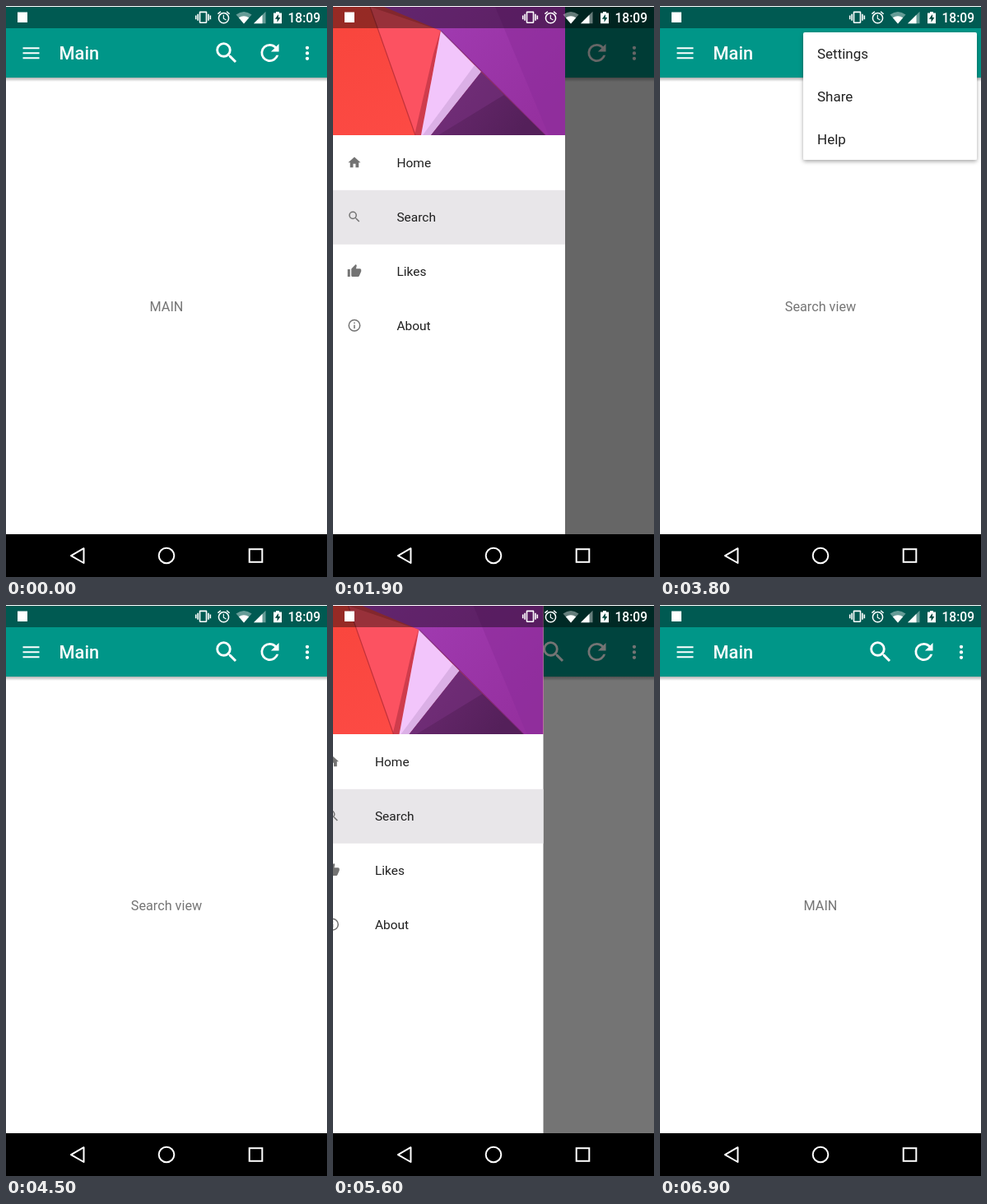
Recreate the animation shown at these times as an HTML page. Size 390 by 694 pixels, loop 7000 ms.

```html
<!DOCTYPE html>
<html lang="en">
<head>
<meta charset="utf-8">
<title>Navigation drawer</title>
<style>
  html, body { margin: 0; width: 100%; height: 100%; overflow: hidden; background: #fff; }
  svg { display: block; width: 100%; height: 100%; }
  text { font-family: Roboto, "Noto Sans", sans-serif; }
  .item { font-size: 15.5px; fill: #1f1f1f; }
  .menu { font-size: 17px; fill: #212121; }
  .body { font-size: 16.2px; fill: #757575; text-anchor: middle; }
</style>
</head>
<body>
<svg viewBox="0 0 390 694" xmlns="http://www.w3.org/2000/svg">
  <defs>
    <linearGradient id="shade" x2="0" y2="1">
      <stop stop-opacity=".3"/><stop offset="1" stop-opacity="0"/>
    </linearGradient>
    <linearGradient id="red" x2="1" y2="1">
      <stop stop-color="#f8453c"/><stop offset="1" stop-color="#ff4d49"/>
    </linearGradient>
    <linearGradient id="violet" x2="1" y2=".7">
      <stop stop-color="#a43eb6"/><stop offset="1" stop-color="#95309f"/>
    </linearGradient>
    <linearGradient id="plum" x2="1" y2=".4">
      <stop stop-color="#6d2a72"/><stop offset="1" stop-color="#54205a"/>
    </linearGradient>
    <filter id="lift" x="-10%" y="-10%" width="120%" height="125%">
      <feDropShadow dx="0" dy="2" stdDeviation="2.5" flood-opacity=".35"/>
    </filter>
    <clipPath id="header"><rect y="1" width="282" height="156"/></clipPath>
  </defs>

  <rect width="390" height="694" fill="#fff"/>
  <rect y="1" width="390" height="86" fill="#009688"/>
  <rect y="87" width="390" height="5" fill="url(#shade)"/>
  <path d="M20.5 51.2h20M20.5 57.2h20M20.5 63.2h20" stroke="#fff" stroke-width="2.1"/>
  <text x="64.5" y="65.3" font-size="21.8" font-weight="500" fill="#fff">Main</text>
  <g id="actions" fill="#fff" fill-rule="evenodd"></g>
  <text id="content" class="body" x="195" y="371"></text>

  <g id="popup">
    <rect x="174" y="32" width="211" height="155" rx="2" fill="#fff" filter="url(#lift)"/>
    <g id="options"></g>
  </g>

  <rect id="scrim" y="1" width="390" height="641"/>
  <g id="drawer">
    <rect y="1" width="282" height="641" fill="#fff"/>
    <g clip-path="url(#header)">
      <rect y="1" width="282" height="156" fill="url(#red)"/>
      <path d="M45 1H140L107 157H100Z" fill="#fc5261"/>
      <path d="M45 1H131V30L60 6Z" fill="#d9404a"/>
      <path d="M131 28L122 58 99 157H108Z" fill="#cf3c4c"/>
      <path d="M45 1L100 157" stroke="#c2323a" stroke-width="1.2"/>
      <path d="M62 1H282V157H258L131 30Z" fill="url(#violet)"/>
      <path d="M197 1H282V157H262Z" fill="#8d2c9b" opacity=".55"/>
      <path d="M131 30L180 80 119 157H107Z" fill="#f2c5fb"/>
      <path d="M172 72L180 80 119 157H109Z" fill="#dbb0e6"/>
      <path d="M180 80L258 157H119Z" fill="url(#plum)"/>
      <path d="M180 80L208 108 128 157H119Z" fill="#7b3382" opacity=".5"/>
      <path d="M131 30L258 157" stroke="#64206f" stroke-width="1.2" opacity=".6"/>
    </g>
    <rect id="mark" width="282" height="66" fill="#e8e6e9"/>
    <g id="items" fill="#737373" fill-rule="evenodd"></g>
  </g>

  <rect y="1" width="390" height="26" opacity=".4"/>
  <rect width="390" height="1" fill="#fff"/>
  <rect x="14" y="7.5" width="12" height="12.5" fill="#fff"/>
  <g id="status" fill="#fff" fill-rule="evenodd"></g>
  <g fill="#fff">
    <path d="M279.5 10.5Q289 3.5 298.5 10.5L289 21.5Z" opacity=".4"/>
    <path d="M282.8 14.3Q289 10 295.2 14.3L289 21.5Z"/>
    <path d="M301 21.3L315.5 6.8V21.3Z" opacity=".4"/>
    <path d="M301 21.3L311.5 10.8V21.3Z"/>
    <path d="M328 7h4v1.6h3V21.2H325V8.6h3Z"/>
    <path d="M331 10L326.8 15.8H329.5V19.8L333.4 14H331Z" fill="#00483f"/>
    <text x="342.5" y="19.7" font-size="15.6" font-weight="500">18:09</text>
  </g>

  <rect y="642" width="390" height="52"/>
  <g fill="none" stroke="#fff" stroke-width="2">
    <path d="M94.5 659.2V677L79 668.1Z" stroke-linejoin="round"/>
    <circle cx="195" cy="668" r="9.3"/>
    <rect x="295.7" y="660.2" width="15.6" height="15.6"/>
  </g>
</svg>
<script>
const LOOP = 7000, STEP = 100, WIDTH = 282, SETTLE = 512;
const ROW = 66.2, TOP = 157;

const icons = {
  search: 'M15.5 14h-.79l-.28-.27A6.47 6.47 0 0 0 16 9.5 6.5 6.5 0 1 0 9.5 16c1.61 0 3.09-.59 4.23-1.57l.27.28v.79l5 4.99L20.49 19zm-6 0a4.5 4.5 0 1 1 0-9 4.5 4.5 0 0 1 0 9z',
  refresh: 'M17.65 6.35A7.96 7.96 0 0 0 12 4a8 8 0 1 0 7.73 10h-2.08A6 6 0 1 1 12 6c1.66 0 3.14.69 4.22 1.78L13 11h7V4z',
  more: 'M12 8a2 2 0 1 0 0-4 2 2 0 0 0 0 4zm0 2a2 2 0 1 0 0 4 2 2 0 0 0 0-4zm0 6a2 2 0 1 0 0 4 2 2 0 0 0 0-4z',
  home: 'M10 20v-6h4v6h5v-8h3L12 3 2 12h3v8z',
  like: 'M1 21h4V9H1zm22-11a2 2 0 0 0-2-2h-6.31l.95-4.57.03-.32c0-.41-.17-.79-.44-1.06L14.17 1 7.59 7.59A1.96 1.96 0 0 0 7 9v10a2 2 0 0 0 2 2h9c.83 0 1.54-.5 1.84-1.22l3.02-7.05c.09-.23.14-.47.14-.73z',
  info: 'M11 17h2v-6h-2zm1-15a10 10 0 1 0 0 20 10 10 0 0 0 0-20zm0 18a8 8 0 1 1 0-16 8 8 0 0 1 0 16zM11 9h2V7h-2z',
  vibrate: 'M0 15h2V9H0zm3 2h2V7H3zm19-8v6h2V9zm-3 8h2V7h-2zM16.5 3h-9C6.67 3 6 3.67 6 4.5v15c0 .83.67 1.5 1.5 1.5h9c.83 0 1.5-.67 1.5-1.5v-15c0-.83-.67-1.5-1.5-1.5zM16 19H8V5h8z',
  alarm: 'M22 5.72l-4.6-3.86-1.29 1.53 4.6 3.86zM7.88 3.39L6.6 1.86 2 5.71l1.29 1.53zM12.5 8H11v6l4.75 2.85.75-1.23-4-2.37zM12 4a9 9 0 1 0 0 18 9 9 0 0 0 0-18zm0 16a7 7 0 1 1 0-14 7 7 0 0 1 0 14z'
};

const $ = id => document.getElementById(id);
const clamp = x => Math.min(1, Math.max(0, x));
const ramp = (t, start, length) => clamp((t - start) / length);
const settle = (t, start) => 1 - (1 - ramp(t, start, SETTLE)) ** 5;

function add(parent, tag, attrs, text = '') {
  const el = document.createElementNS('http://www.w3.org/2000/svg', tag);
  for (const key in attrs) el.setAttribute(key, attrs[key]);
  el.textContent = text;
  $(parent).append(el);
}

// Places a 24-unit icon by its centre.
function icon(parent, name, x, y, scale) {
  add(parent, 'path', {
    d: icons[name],
    transform: `translate(${x} ${y}) scale(${scale}) translate(-12 -12)`
  });
}

icon('actions', 'search', 268, 57, 1.42);
icon('actions', 'refresh', 320.5, 57, 1.38);
icon('actions', 'more', 366, 57.3, 1.083);
icon('status', 'vibrate', 239.5, 13.8, .8);
icon('status', 'alarm', 264.5, 13.9, .76);

[['home', 'Home'], ['search', 'Search'], ['like', 'Likes'], ['info', 'About']].forEach(([name, label], i) => {
  const y = 190 + i * 66;
  icon('items', name, 26, y + .2, .75);
  add('items', 'text', { class: 'item', x: 77.4, y: y + 6.3 }, label);
});
['Settings', 'Share', 'Help'].forEach((label, i) =>
  add('options', 'text', { class: 'menu', x: 191, y: 64 + i * 52 }, label));

function draw(t) {
  const open = settle(t, 678) - settle(t, 1950) + settle(t, 5407) - settle(t, 6450);
  const searching = t >= 1900 && t < 6400;

  $('drawer').setAttribute('transform', `translate(${(open - 1) * WIDTH} 0)`);
  $('drawer').setAttribute('visibility', open > .001 ? 'visible' : 'hidden');
  $('scrim').setAttribute('opacity', .6 * open);
  $('mark').setAttribute('y', TOP + (searching ? ROW + .6 : 0));
  $('content').textContent = searching ? 'Search view' : 'MAIN';

  const grow = 1 - (1 - ramp(t, 3540, 260)) ** 2;
  const size = .5 + .5 * grow;
  $('popup').setAttribute('opacity', grow * (1 - ramp(t, 4220, 260)));
  $('popup').setAttribute('transform', `translate(385 32) scale(${size}) translate(-385 -32)`);
}

const began = performance.now();
function tick() {
  const t = (performance.now() - began) % LOOP;
  draw(Math.floor(t / STEP) * STEP);
  requestAnimationFrame(tick);
}
tick();
</script>
</body>
</html>
```
